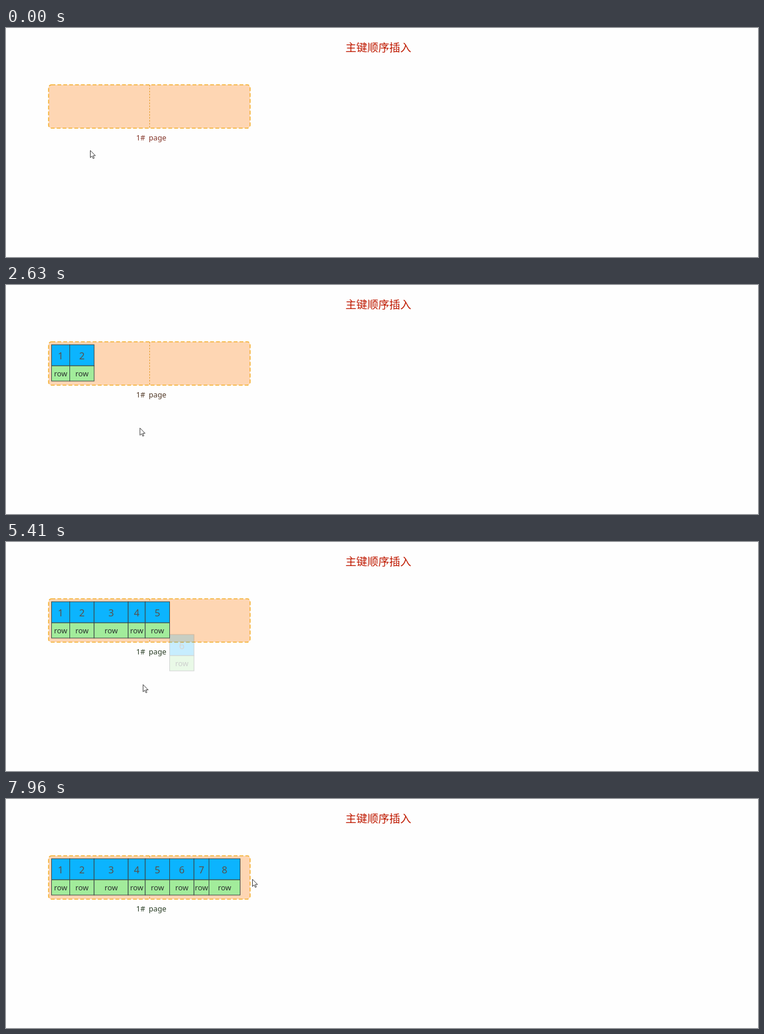
These frames come from a looping animation (1280 by 391 pixels, 8 s). An HTML page:

```html
<!DOCTYPE html>
<html lang="zh">
<head>
<meta charset="utf-8">
<title>主键顺序插入</title>
<style>
html, body { margin: 0; width: 100%; height: 100%; overflow: hidden; background: #fefefe; }
svg { display: block; width: 100%; height: 100%; }
text { font-family: "Noto Sans", "Open Sans", sans-serif; }
.title { font: 500 18.67px "Noto Sans CJK SC", "Noto Sans CJK", sans-serif; fill: #bf1a00; }
.label { font-size: 12.7px; }
.key { font-size: 16.5px; fill: #57504c; text-anchor: middle; }
.row { font-size: 12.8px; font-weight: 500; fill: #2b3230; text-anchor: middle; }
.cell rect { stroke: #3a4444; stroke-width: 1; }
</style>
</head>
<body>
<svg viewBox="0 0 1280 391">
  <text class="title" x="577.7" y="40">主键顺序插入</text>
  <rect x="72.5" y="97" width="343" height="74" rx="5" fill="#fed6b3" stroke="#f3ae2b" stroke-width="1.6" stroke-dasharray="6.5 3.5"/>
  <path id="split" d="M244.5 97V171" stroke="#e6a033" stroke-dasharray="3 2"/>
  <g id="label" class="label"><text x="221.5" y="192">1#</text><text x="243" y="192">page</text></g>
  <g id="cells"></g>
  <path id="cursor" d="M0 0V12.3L2.8 9.7L4.9 14L6.7 13.1L4.7 9H8.7Z" fill="#fff" stroke="#3a3a3a"/>
</svg>
<script>
const LOOP = 8000, FLOAT = 500, RISE = 72;
const edges = [77.5, 108.5, 150, 208, 237, 278.5, 320, 345.5, 398.5];
const starts = [600, 2010, 3064, 3850, 4640, 5300, 5840, 6490];
// cursor moves: start, end, target x, target y
const moves = [[900, 1800, 186, 260.5], [2250, 2750, 235, 241.5], [5180, 5380, 233.3, 243.5], [7430, 7960, 419.5, 137]];

const $ = id => document.getElementById(id);
const clamp = v => Math.min(1, Math.max(0, v));
const lerp = (a, b, p) => a + (b - a) * p;
const smooth = p => p * p * (3 - 2 * p);

function add(parent, tag, attrs, text = "") {
  const node = document.createElementNS("http://www.w3.org/2000/svg", tag);
  for (const k in attrs) node.setAttribute(k, attrs[k]);
  node.textContent = text;
  return parent.appendChild(node);
}

const cells = starts.map((_, i) => {
  const x = edges[i], width = edges[i + 1] - x, mid = x + width / 2;
  const g = add($("cells"), "g", { class: "cell" });
  add(g, "rect", { x, y: 102, width, height: 36, fill: "#0cb4fe" });
  add(g, "rect", { x, y: 138, width, height: 26, fill: "#a2ec9b" });
  add(g, "text", { class: "key", x: mid, y: 127 }, i + 1);
  add(g, "text", { class: "row", x: mid, y: 155.7 }, "row");
  return g;
});

function draw(t) {
  cells.forEach((g, i) => {
    const p = clamp((t - starts[i]) / FLOAT);
    g.setAttribute("opacity", p);
    g.setAttribute("transform", `translate(0 ${RISE * (1 - p)})`);
  });

  let x = 143.5, y = 209;
  for (const [from, to, tx, ty] of moves) {
    const p = smooth(clamp((t - from) / (to - from)));
    x = lerp(x, tx, p);
    y = lerp(y, ty, p);
  }
  $("cursor").setAttribute("transform", `translate(${x} ${y})`);

  const p = clamp(t / 4700);
  $("label").setAttribute("fill", `rgb(${lerp(132, 42, p)}, ${lerp(54, 62, p)}, ${lerp(42, 38, p)})`);
}

function tick() {
  draw(performance.now() % LOOP);
  requestAnimationFrame(tick);
}
tick();
</script>
</body>
</html>
```
